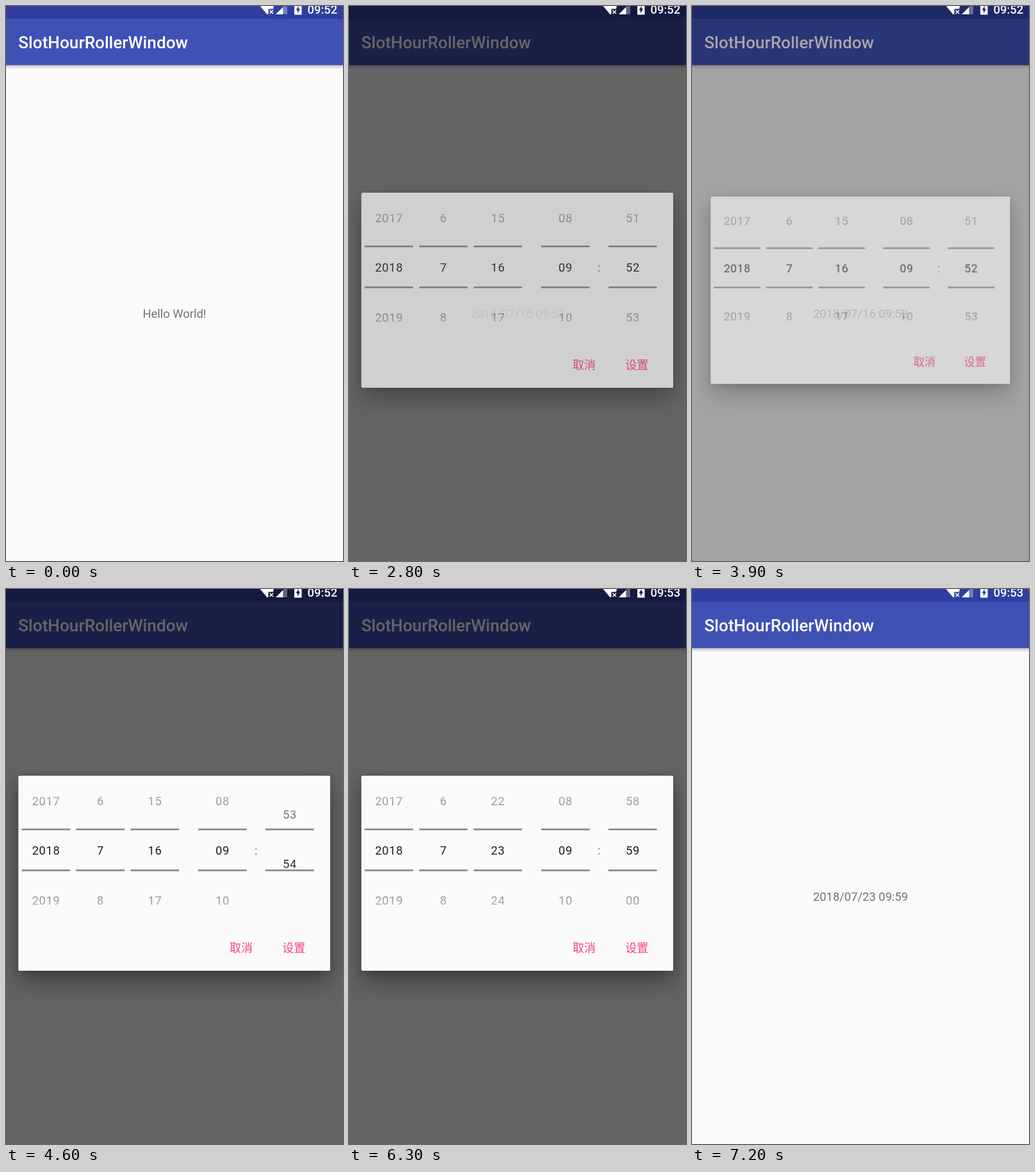
An HTML page with a canvas that plays this animation: 526 px wide and 865 px high, repeating every 8000 ms.

```html
<!DOCTYPE html>
<html lang="en">
<head>
<meta charset="utf-8">
<title>Date and time dialog</title>
<style>
  html, body { margin: 0; width: 100%; height: 100%; overflow: hidden; background: #fafafa; }
  canvas { display: block; }
</style>
</head>
<body>
<canvas id="stage" width="526" height="865"></canvas>
<script>
const W = 526, H = 865, LOOP = 8000, STEP = 100;
const stage = document.getElementById('stage').getContext('2d');
const layer = document.createElement('canvas');
layer.width = W;
layer.height = H;
const panel = layer.getContext('2d');

const SANS = 'Roboto, "Noto Sans", sans-serif';
const BODY = '400 18.4px ' + SANS;
const MEDIUM = '500 18.4px ' + SANS;
const CJK = '500 18px "Noto Sans CJK SC", "Noto Sans CJK", sans-serif';

const MID = 408, ROW = 77.2, REACH = 90;
const BOX = { x: 19.5, y: 291, w: 486.5, h: 304 };

function text(c, str, x, y, font, color, align = 'center', spacing = 0) {
  c.font = font;
  c.fillStyle = color;
  c.textAlign = align;
  c.letterSpacing = spacing + 'px';
  c.fillText(str, x + (align === 'center' ? spacing / 2 : 0), y);
}

function shape(c, color, ...points) {
  c.fillStyle = color;
  c.beginPath();
  points.forEach(([x, y]) => c.lineTo(x, y));
  c.fill();
}

const plain = n => String(n);
const padded = mod => n => String((n + mod) % mod).padStart(2, '0');

// Decelerating fling from one value to another
function fling(t, start, from, to) {
  const u = Math.min(1, Math.max(0, (t - start) / 1000));
  return from + (to - from) * (1 - Math.pow(1 - u, 2.69));
}

function dialogState(t) {
  for (const [open, close] of [[500, 2800], [3900, 7000]]) {
    if (t < open || t >= close + 200) continue;
    if (t < open + 100) return { alpha: 0.6, dim: 0.35, scale: 0.96 };
    if (t < close) return { alpha: 1, dim: 0.6, scale: 1 };
    if (t < close + 100) return { alpha: 0.72, dim: 0.6, scale: 1 };
    return { alpha: 0.12, dim: 0.3, scale: 1 };
  }
  return null;
}

function drawApp(c, label) {
  c.fillStyle = '#fafafa';
  c.fillRect(0, 0, W, H);
  const shadow = c.createLinearGradient(0, 92, 0, 99);
  shadow.addColorStop(0, 'rgba(0,0,0,.3)');
  shadow.addColorStop(0.4, 'rgba(0,0,0,.1)');
  shadow.addColorStop(1, 'rgba(0,0,0,0)');
  c.fillStyle = shadow;
  c.fillRect(0, 92, W, 7);
  c.fillStyle = '#3f51b5';
  c.fillRect(0, 0, W, 92);
  c.fillStyle = '#303f9f';
  c.fillRect(0, 0, W, 20);
  text(c, 'SlotHourRollerWindow', 19.2, 66, '500 26.2px ' + SANS, '#fff', 'left');
  text(c, label, 263, 486, BODY, '#737373');
}

function drawStatus(c, clock, dim) {
  const bar = `rgb(${[48, 63, 159].map(v => Math.round(v * (1 - dim)))})`;
  shape(c, '#fff', [396.5, 0], [418, 0], [417, 4.5], [409.5, 4.5], [409.5, 11.5], [408, 13.5]);
  c.strokeStyle = '#fff';
  c.lineWidth = 1.5;
  c.beginPath();
  c.moveTo(411.5, 6.5);
  c.lineTo(417, 12);
  c.moveTo(417, 6.5);
  c.lineTo(411.5, 12);
  c.stroke();
  shape(c, 'rgba(255,255,255,.32)', [432.5, 13], [432.5, 1.5], [434, 0], [439, 0], [439, 13]);
  shape(c, '#fff', [421, 13], [432.5, 1.5], [432.5, 13]);
  c.fillStyle = '#fff';
  c.fillRect(450, 0, 11.5, 13.5);
  shape(c, bar, [456.7, 0], [456.7, 4.2], [459.2, 4.2], [455, 11.5], [455, 6.5], [452.5, 6.5]);
  text(c, clock, 470.5, 12, MEDIUM, '#fff', 'left');
}

function drawWheel(c, x, value, format) {
  const fade = c.createLinearGradient(0, MID - REACH, 0, MID + REACH);
  for (const [d, a] of [[90, 0], [86, 0.3], [9, 0.87]]) {
    const color = `rgba(0,0,0,${a})`;
    fade.addColorStop((REACH - d) / (2 * REACH), color);
    fade.addColorStop((REACH + d) / (2 * REACH), color);
  }
  const first = Math.floor(value) - 1;
  for (let n = first; n < first + 4; n++) {
    text(c, format(n), x, MID + (n - value) * ROW + 6.4, BODY, fade, 'center', 0.6);
  }
  c.fillStyle = '#878787';
  c.fillRect(x - 37.7, 373.4, 75.6, 2.6);
  c.fillRect(x - 37.7, 437.2, 75.6, 2.6);
}

function drawPanel(c, t) {
  c.clearRect(0, 0, W, H);
  for (const [blur, drop, a] of [[36, 17, 0.36], [12, 3, 0.16]]) {
    c.save();
    c.shadowColor = `rgba(0,0,0,${a})`;
    c.shadowBlur = blur;
    c.shadowOffsetY = drop;
    c.fillStyle = '#fafafa';
    c.beginPath();
    c.roundRect(BOX.x, BOX.y, BOX.w, BOX.h, 2.6);
    c.fill();
    c.restore();
  }
  drawWheel(c, 62.2, 2018, plain);
  drawWheel(c, 147.2, 7, plain);
  drawWheel(c, 232.2, fling(t, 5300, 16, 23), plain);
  drawWheel(c, 337.7, 9, padded(24));
  drawWheel(c, 442.7, fling(t, 4500, 52, 59), padded(60));
  text(c, ':', 390.3, 414, BODY, '#737373');
  text(c, '取消', 367, 565.5, CJK, '#ff4081');
  text(c, '设置', 449.3, 565.5, CJK, '#ff4081');
}

function draw(t) {
  const label = t < 2800 ? 'Hello World!' : t < 7000 ? '2018/07/16 09:52' : '2018/07/23 09:59';
  const dialog = dialogState(t);
  drawApp(stage, label);
  if (dialog) {
    stage.fillStyle = `rgba(0,0,0,${dialog.dim})`;
    stage.fillRect(0, 0, W, H);
    drawPanel(panel, t);
    const cx = BOX.x + BOX.w / 2, cy = BOX.y + BOX.h / 2;
    stage.save();
    stage.globalAlpha = dialog.alpha;
    stage.translate(cx, cy);
    stage.scale(dialog.scale, dialog.scale);
    stage.drawImage(layer, -cx, -cy);
    stage.restore();
  }
  drawStatus(stage, t < 5900 ? '09:52' : '09:53', dialog ? dialog.dim : 0);
}

const begin = performance.now();
function tick() {
  const t = (performance.now() - begin) % LOOP;
  draw(Math.floor(t / STEP) * STEP);
  requestAnimationFrame(tick);
}
tick();
</script>
</body>
</html>
```
